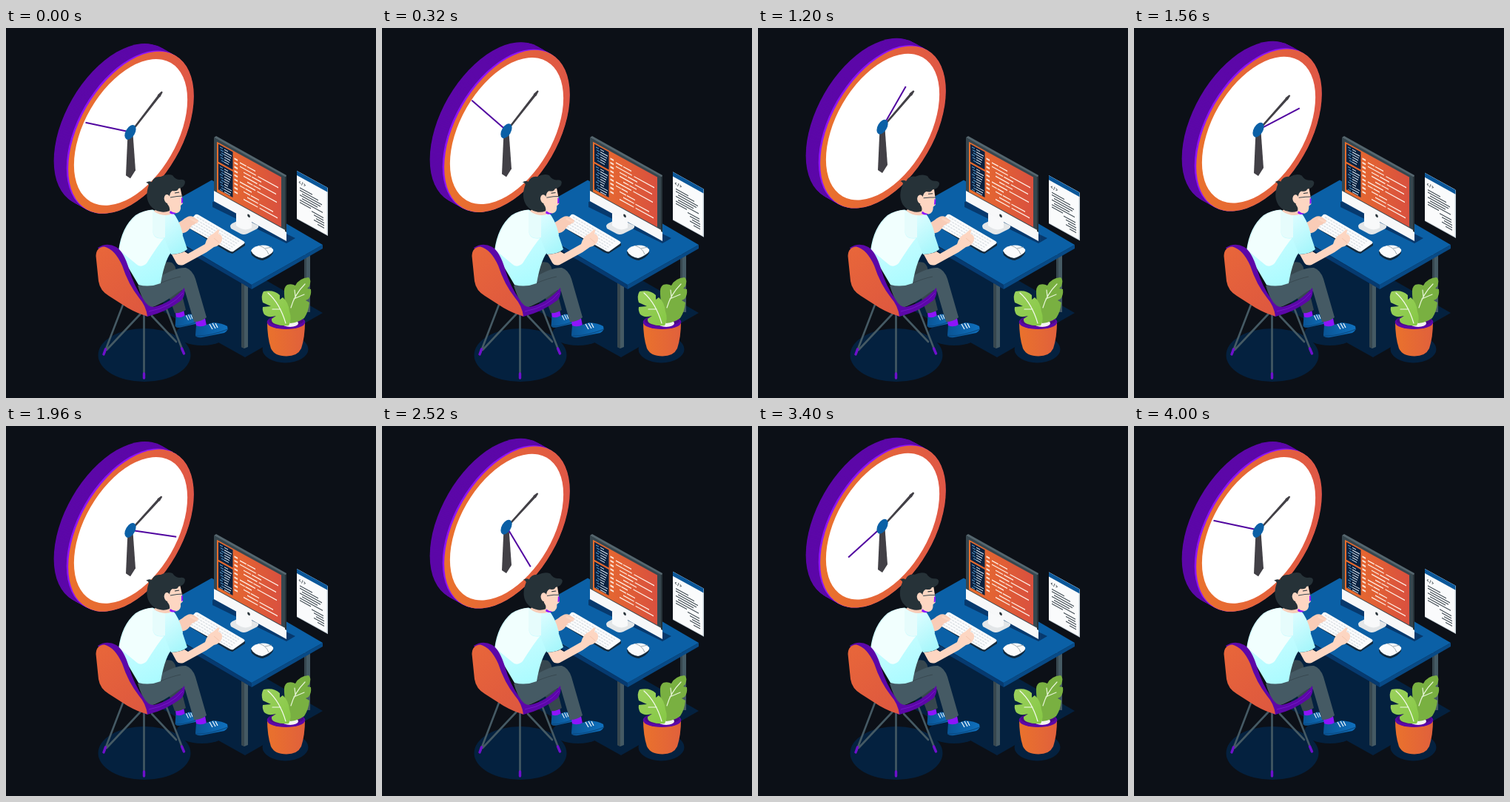
These frames come from a looping animation (500x500 px, 4.04 s). An HTML page with a canvas:

```html
<!DOCTYPE html>
<html lang="en">
<head>
<meta charset="utf-8">
<title>Working late</title>
<style>
html, body { margin: 0; width: 100%; height: 100%; overflow: hidden; background: #0c1017; }
canvas { display: block; width: 500px; height: 500px; }
</style>
</head>
<body>
<canvas id="stage" width="500" height="500"></canvas>
<script>
const ctx = document.getElementById('stage').getContext('2d');
const LOOP = 4040, STEP = 40, TURN = 4000;

const SLATE = '#455a64', INK = '#263238', PURPLE = '#5c07a8', VIOLET = '#8e14fb';
const BLUE = '#0b60a6', NAVY = '#04213f', SKIN = '#fdd6c2', PAPER = '#fff', STEEL = '#424046';

function grad(x0, y0, x1, y1, ...colors) {
  const g = ctx.createLinearGradient(x0, y0, x1, y1);
  colors.forEach((c, i) => g.addColorStop(i / (colors.length - 1), c));
  return g;
}
const EMBER = grad(-98, 0, 98, 0, '#ea722c', '#df5746');
const SHELL = grad(122, 300, 195, 385, '#e8663a', '#dd573f');
const SCREEN = grad(0, 0, 92, 0, '#e96f2b', '#d9503f');
const POT = grad(352, 0, 405, 0, '#ea722c', '#e0603c');
const SHIRT = grad(160, 250, 205, 350, '#d9fdff', '#a9fbff');
const SLEEVE = grad(212, 255, 244, 300, '#dcfdff', '#a4f6fb');
const SHOE = grad(0, 0, 42, 0, '#0a5596', '#0f70bd');
const LEAF = grad(345, 360, 385, 400, '#9ad05c', '#86c845');

const fill = (d, c) => { ctx.fillStyle = c; ctx.fill(new Path2D(d)); };
function line(d, c, w = 1, cap = 'butt') {
  ctx.strokeStyle = c; ctx.lineWidth = w; ctx.lineCap = cap;
  ctx.stroke(new Path2D(d));
}
function oval(x, y, rx, ry, c, a = 0) {
  ctx.fillStyle = c;
  ctx.beginPath();
  ctx.ellipse(x, y, rx, ry, a, 0, 7);
  ctx.fill();
}
const rect = (x, y, w, h, c) => { ctx.fillStyle = c; ctx.fillRect(x, y, w, h); };
function within(setup, draw) { ctx.save(); setup(); draw(); ctx.restore(); }

// Disc standing upright in the isometric plane
function disc(x, y, r, c) {
  within(() => ctx.transform(.866, -.5, 0, 1, x, y), () => oval(0, 0, r, r, c));
}

function drawClock(t, lift) {
  within(() => ctx.translate(168.5, 141.2 - 8 * lift), () => {
    for (let k = 20; k >= 0; k--) disc(-.95 * k, -.53 * k, 98, k > 2 ? PURPLE : VIOLET);
    disc(.5, 0, 98, EMBER);
    disc(0, -.3, 88.5, PAPER);
    fill('M-4 2 L3 2 L6.5 51 L-.5 62 L-6.5 58Z', STEEL);

    const p = Math.min(1, t / 2000), e = (1 - Math.cos(Math.PI * p)) / 2;
    const mx = 42.5 - .5 * e, my = -55 + 9 * e;
    const m = Math.hypot(mx, my), nx = -my / m, ny = mx / m;
    const at = (s, w) => (mx * s + nx * w) + ' ' + (my * s + ny * w);
    fill(`M${at(0, -1.2)} L${at(.88, -1.7)} L${at(.9, -2.2)} L${at(1, -1)} L${at(1, 1)} L${at(.9, 2.2)} L${at(.88, 1.7)} L${at(0, 1.2)}Z`, STEEL);

    const a = 2 * Math.PI * t / TURN, c = Math.cos(a), s = Math.sin(a);
    line(`M0 -.5 L${-61 * c + 13 * s} ${-13 * c - 61.5 * s - .5}`, '#5106a0', 2);
    disc(-.5, -.3, 8.8, BLUE);
  });
}

function drawFloor() {
  oval(187, 442, 62.5, 36, NAVY);
  oval(377.5, 434, 31, 18.5, NAVY);
  oval(265, 413, 35, 16, NAVY);
  fill('M215 300 L280 300 L428 385 L323 445 L212 383Z', NAVY);
}

function drawDesk() {
  rect(403, 306, 8, 78, SLATE);
  rect(403, 306, 3, 78, '#37474f');
  fill('M183 260 L332 347 L332 353 L183 266Z', '#063a70');
  fill('M428 293 L428 298 L332 353 L332 347Z', '#084a86');
  fill('M278 205.5 L428 293 L332 347 L183 259Z', BLUE);
  fill('M279 235 L286 233 L391 284 L379 291 L279 242Z', '#07396d');
  fill('M318 345 L327 350 L327 431 L322 433 L318 431Z', SLATE);
  fill('M318 345 L322 347 L322 433 L318 431Z', '#37474f');
}

function drawMonitor() {
  fill('M303 268 Q303 265 308 263 L320 257 L341 267 Q342 270 338 272 L326 278 Q321 280 317 278 L304 271Z', '#e3e6e8');
  fill('M311 250 L332 260 L332 270 Q322 276 311 267Z', '#f8f9fa');
  fill('M281 148 L284 146 L379 199 L378 203Z', '#55666e');
  within(() => ctx.transform(1, .55, 0, 1, 281, 148), () => {
    rect(0, 0, 98, 73, '#37474f');
    rect(0, 72, 98, 14, '#f7f8f9');
    rect(96, 0, 2, 74, INK);
    rect(4, 3.5, 87, 67.5, SCREEN);
    for (const [y, h] of [[5.5, 24], [32, 35]]) {
      rect(6, y, 19.5, h, '#0b2240');
      for (let j = 0; j * 3.4 + 4 < h; j++) {
        rect(8 + j % 3, y + 2.5 + j * 3.4, 4, 1, '#5fa8dc');
        rect(14, y + 2.5 + j * 3.4, 5 + j * 5 % 6, 1.1, '#dce8f2');
      }
    }
    for (let j = 0; j < 9; j++) rect(27.5, 12 + j * 5.6, 4.6, 2.3, '#fbe3d6');
    const rows = [[35, 21], [35, 52], [40, 24], [40, 44], [45, 18], [35, 50], [35, 16], [40, 21], [45, 35], [40, 46]];
    rows.forEach(([x, w], j) => {
      rect(x, 14 + j * 5.2, w * .42, 1.4, '#fff1e8');
      rect(x + w * .47, 14 + j * 5.2, w * .53, 1.4, '#fff1e8');
    });
    oval(47, 80, 1.8, 2, INK);
  });
}

function drawSheet(drop) {
  within(() => ctx.transform(1, .55, 0, 1, 393, 193 + 7 * drop), () => {
    rect(0, 0, 42, 65, '#c8d2d9');
    rect(0, 0, 40.5, 64, '#fafbfc');
    rect(0, 0, 41.5, 6, '#0b5799');
    line('M5 12 L3 13.5 L5 15 M8 11 L6.5 16 M9.5 12 L11.5 13.5 L9.5 15', INK, .7);
    const rows = [[4, 17], [4, 25], [7, 27], [4, 28], [7, 21], [4, 31], [4, 15], [20, 16], [23, 13], [26, 11], [23, 14], [28, 9]];
    rows.forEach(([x, w], j) => rect(x, 20 + j * 3.3, w, 1.25, '#3f4a52'));
  });
}

function drawKeys() {
  fill('M243 268 L257 253 L323 291 L323 294 L306 305 L300 303Z', '#142a3d');
  fill('M242 266 L256 252 Q258 251 261 253 L321 288 Q324 290 321 292 L307 302 Q305 303 302 301 L243 268Z', '#fbfcfd');
  for (let r = 0; r < 5; r++) {
    const x = 258 - r * 2.9, y = 255.5 + r * 2.6;
    ctx.setLineDash([3, 1.2]);
    line(`M${x} ${y} l58 33.6`, '#dde2e6', 1.5);
    ctx.setLineDash([]);
  }
  fill('M331 303 Q331 299 337 296 L355 298 Q362 301 361 304 Q357 311 347 314 Q340 314 332 307Z', '#10283d');
  fill('M331 301 Q333 296 342 294 Q354 292 361 299 Q362 302 358 305 Q351 310 346 311 Q335 309 331 301Z', '#fafbfc');
  line('M342 294 Q352 297 355 306 M350 298 L359 296', '#8d999f', .8);
}

function drawChairBase() {
  const legs = 'M158 374 L133 439 M182 386 L136 435 M186.5 385 L186.5 473 M197 389 L230 424 M217 380 L240 439';
  line(legs, SLATE, 2.6, 'round');
  line('M134.5 434 L132 441 M186.5 467 L186.5 473 M237.5 433 L240.5 440', '#6f10cc', 3.4, 'round');
}

function drawShoe(x, y) {
  within(() => ctx.translate(x, y), () => {
    fill('M0 1 Q7 4 14 0 L23 -3 Q36 -2 42 2 Q44 8 38 11 L8 17 Q0 18 -1 14Z', SHOE);
    line('M-1 15 Q18 16 43 6', '#0a4a82', 1.2);
    line('M18 -1 L22 6 M22 -2 L26 5 M26 -2 L29 4', '#eef6fb', 1.3);
  });
}

function drawLegs() {
  fill('M229 384 L240 381 L242 390 L230 393Z', VIOLET);
  within(() => ctx.transform(.78, 0, 0, .9, 50, 27.5), () => drawShoe(230, 402));
  fill('M205 322 Q215 314 224 317 Q229 320 230 329 L243 381 Q235 386 228 385 L214 346Z', '#37474f');
  fill('M256 395 L269 392 L271 402 Q263 406 257 403Z', VIOLET);
  drawShoe(257, 401);
  fill('M178 348 L208 336 Q230 323 243 324 Q252 327 256 339 L271 391 Q264 397 254 397 L242 356 Q238 352 231 358 Q211 374 192 379 Q183 365 178 348Z', SLATE);
  line('M208 345 Q225 338 236 336', '#37474f', .9);
}

function drawBody() {
  // far arm
  fill('M225 268 L238 260 Q247 252 253 255 L260 260 Q257 265 251 267 Q246 276 240 277 L230 279Z', '#f9ccb7');
  line('M250 258 L258 262', SKIN, 3, 'round');
  fill('M198 245.5 Q212 252 225 249 Q234 258 239 279 L226 300 Q215 310 209 345 Q194 351 179 347 L152 301 Q156 269 175 253 Q186 246 198 245.5Z', SHIRT);
  fill('M196 246 Q206 252 214 251 L215 282 Q205 294 190 318 Q182 325 176 319 L153 300 Q158 269 176 254 Q186 247 196 246Z', '#f1fffe');
  fill('M198 249 Q212 253 225 250 Q234 260 238 278 L245 299 Q237 306 223 306 L214 284 Q198 287 198 272Z', SLEEVE);
  fill('M198 249 L215 252 L215 283 Q199 287 198 272Z', '#e6fcfc');
  // near arm
  fill('M224 306 Q236 305 241 302 L246 305 L269 292 Q272 281 280 278 L287 272 Q289 273 287 278 Q293 280 292 286 Q290 294 281 296 L271 303 L240 320 Q233 322 230 317Z', SKIN);
  line('M281 284 L288 290', '#f2bfa8', .8);
}

function drawHead(nod) {
  within(() => {
    ctx.translate(213, 250);
    ctx.rotate(.085 * nod);
    ctx.translate(-213, -250);
  }, () => {
    fill('M207 240 L225 240 L225 251 Q213 256 200 248Z', '#f9cdb8');
    fill('M214 222 L235 214 L238 228 L239 237 L236 240 Q237 248 231 250 Q225 251 220 246Z', SKIN);
    fill('M222 247 Q226 250 230 250 Q226 253 221 250Z', VIOLET);
    fill('M237 229 L239 230 L239 236 L237 237Z', VIOLET);
    fill('M189 209 Q193 206 197 208 Q200 200 209 201 Q218 196 225 199 Q229 205 235 205 Q241 204 242 208 Q242 215 233 217 Q232 221 225 220 Q221 222 221 229 L218 238 Q222 242 221 247 Q214 250 208 248 Q201 247 195 240 Q187 229 193 212 Q192 209 189 209Z', INK);
    oval(218, 231, 4.2, 6, SKIN, -.2);
    line('M222 229 L231 227.5 L239 227', '#37474f', 1);
    line('M228 223 L234 222', INK, 1.1);
  });
}

function drawChairBack() {
  fill('M124 297 Q136 289 149 296 Q159 302 166 325 Q173 349 186 367 Q191 377 200 377 Q224 371 241 351 Q243 361 237 368 Q216 384 191 390 Q177 386 164 366Z', PURPLE);
  fill('M121.5 308 Q122 296 133 295.5 Q147 299 157 321 Q165 346 180 365 Q189 375 191 389.5 Q178 386 164 378 L139 362 Q127 355 125 342Z', SHELL);
  line('M193 383 Q224 377 239 358', '#7a1bd0', .8);
}

function drawPlant() {
  fill('M353 397 L404 397 Q404 418 399 433 Q394 443.5 379 443.5 Q363 443.5 358 433 Q353 418 353 397Z', POT);
  oval(378.5, 397.5, 25.8, 9.5, PURPLE);
  oval(378.5, 395.5, 23.5, 7.5, '#4b0a86');
  oval(384, 399, 11, 5, '#f4f4f2');
  fill('M384 399 L383 386 Q376 373 376 360 Q375 350 380 347 Q386 345 391 348 Q396 338 409 337 Q413 340 410 349 L407 352 L412 353 Q413 361 409 366 L405 368 L410 371 Q409 383 403 392 Q395 398 384 399Z', '#79b041');
  fill('M382 402 Q372 403 364 400 Q358 398 359 393 L365 389 Q354 392 349 387 Q346 382 347 377 L358 376 L347 371 Q344 362 348 356 Q362 353 370 361 L370 367 L374 364 Q382 371 383 383 Q387 394 382 402Z', LEAF);
  line('M354 358 Q370 372 378 399 M371 380 L360 380', '#f4faec', 1.2, 'round');
  line('M404 346 Q390 360 385 378 M391 363 L390 354 M389 366 Q396 363 403 360', '#e7f4d8', 1.2, 'round');
}

function draw(t) {
  const sway = (1 - Math.cos(2 * Math.PI * t / 2000)) / 2;
  rect(0, 0, 500, 500, '#0c1017');
  drawClock(t, sway);
  drawFloor();
  drawDesk();
  drawMonitor();
  drawSheet(sway);
  drawKeys();
  drawChairBase();
  drawLegs();
  drawBody();
  drawHead(sway);
  drawChairBack();
  drawPlant();
}

const start = performance.now();
function tick() {
  const t = (performance.now() - start) % LOOP;
  draw(Math.floor(t / STEP) * STEP);
  requestAnimationFrame(tick);
}
tick();
</script>
</body>
</html>
```
